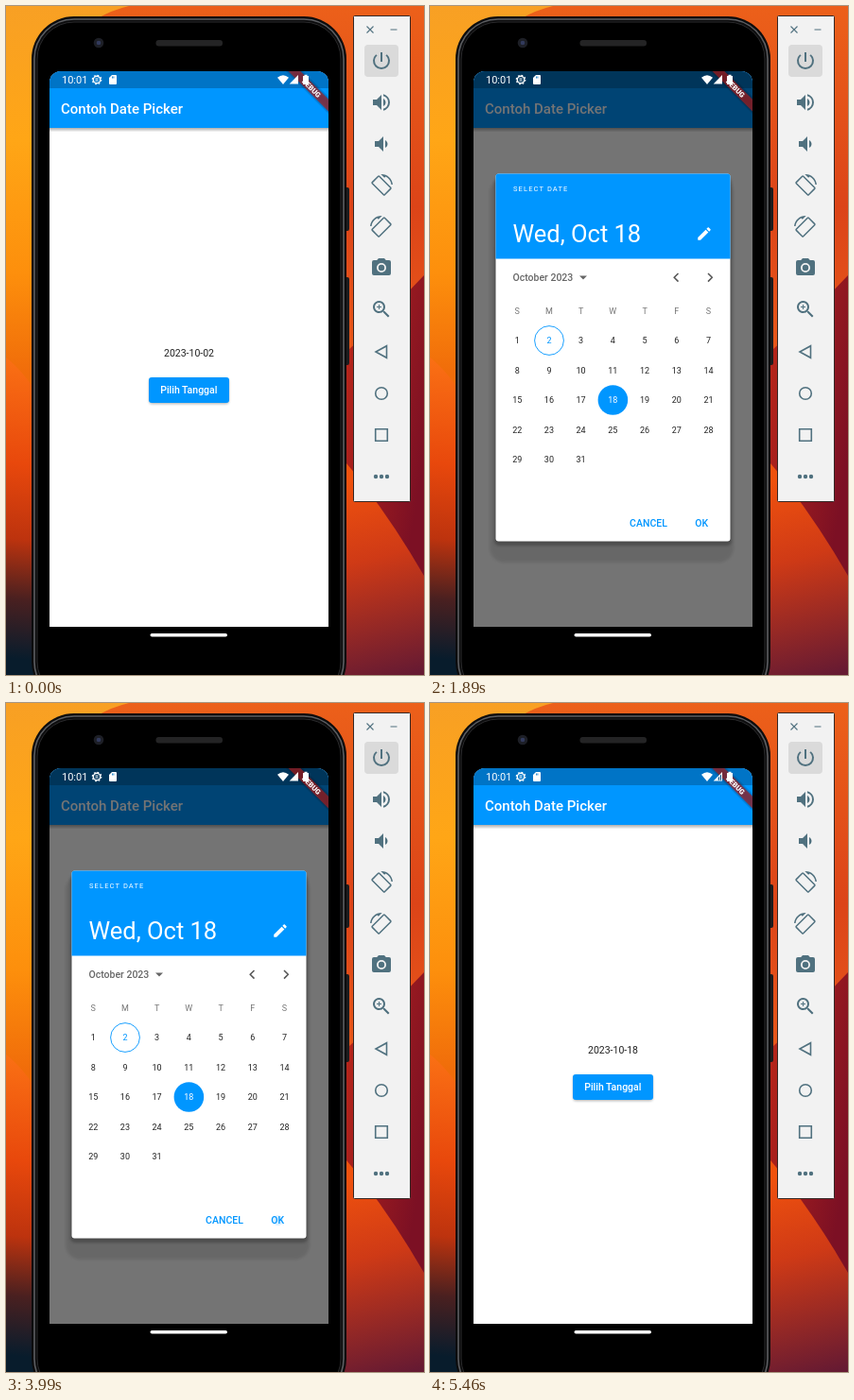
Write an HTML page that moves like this. It is 442x708 px and loops after 5950 ms.

```html
<!DOCTYPE html>
<html lang="id">
<head>
<meta charset="utf-8">
<title>Date picker</title>
<style>
  html, body { margin: 0; width: 100%; height: 100%; overflow: hidden; background: #000; }
  svg { display: block; width: 442px; height: 708px; }
  text { font: 10.5px Roboto, sans-serif; }
  .medium { font-weight: 500; }
  .mid { text-anchor: middle; }
  .white { fill: #fff; }
  .blue { fill: #0096ff; }
  .title { font-size: 15px; }
  .small { font-size: 9px; }
  .line { fill: none; stroke: #50717f; stroke-width: 1.6; }
</style>
</head>
<body>
<svg viewBox="0 0 442 708">
  <defs>
    <linearGradient id="left" x2="0" y2="1">
      <stop offset="0" stop-color="#f8a024"/>
      <stop offset=".2" stop-color="#ffa616"/>
      <stop offset=".4" stop-color="#fd8f0c"/>
      <stop offset=".55" stop-color="#f06c0a"/>
    </linearGradient>
    <linearGradient id="petal" gradientUnits="userSpaceOnUse" x1="30" y1="375" x2="0" y2="690">
      <stop offset="0" stop-color="#fa7014"/>
      <stop offset=".35" stop-color="#e8480c"/>
      <stop offset=".6" stop-color="#bd330e"/>
      <stop offset=".8" stop-color="#4a2020"/>
      <stop offset="1" stop-color="#081c2c"/>
    </linearGradient>
    <linearGradient id="right" x2="0" y2="1">
      <stop offset="0" stop-color="#ec601a"/>
      <stop offset=".3" stop-color="#dc4418"/>
      <stop offset=".52" stop-color="#e8581a"/>
      <stop offset="1" stop-color="#d03a18"/>
    </linearGradient>
    <linearGradient id="crimson" x2="1" y2=".6">
      <stop offset="0" stop-color="#c42a18"/>
      <stop offset="1" stop-color="#7c1024"/>
    </linearGradient>
    <linearGradient id="flame" gradientUnits="userSpaceOnUse" x1="372" y1="500" x2="425" y2="708">
      <stop offset="0" stop-color="#f0520e"/>
      <stop offset=".4" stop-color="#cf3a16"/>
      <stop offset="1" stop-color="#661a32"/>
    </linearGradient>
    <linearGradient id="drop" x2="0" y2="1">
      <stop offset="0" stop-opacity=".32"/>
      <stop offset="1" stop-opacity="0"/>
    </linearGradient>
    <filter id="soft"><feGaussianBlur stdDeviation="1.5"/></filter>
    <clipPath id="screen"><path d="M46 657V81a12 12 0 0 1 12-12H329a12 12 0 0 1 12 12V657Z"/></clipPath>
  </defs>

  <!-- wallpaper -->
  <path fill="url(#right)" d="M0 0H442V708H0Z"/>
  <path fill="url(#left)" d="M0 0H130Q95 8 60 40V708H0Z"/>
  <path fill="url(#petal)" d="M0 372Q16 384 36 414V708H0Z"/>
  <path fill="url(#crimson)" d="M350 375Q400 330 442 285V610L350 475Z"/>
  <path fill="url(#flame)" d="M350 472Q400 530 442 603V708H350Z"/>

  <!-- phone -->
  <path fill="#1c1c1e" d="M358 192h3q2 0 2 2v42q0 2-2 2h-3zM358 287h3q2 0 2 2v89q0 2-2 2h-3zM30 555h-3v60h3z"/>
  <rect x="27" y="11" width="333" height="728" rx="45" fill="#0c0c0d"/>
  <rect x="30" y="14" width="327" height="722" rx="42" fill="none" stroke="#5c5e62" stroke-width="1.6"/>
  <rect x="33" y="17" width="321" height="716" rx="39" fill="#000" stroke="#2a2a2c"/>
  <rect x="158.500" y="36" width="70.500" height="6.500" rx="3" fill="#242425"/>
  <circle cx="98" cy="39" r="5.300" fill="#1d1f26"/>
  <circle cx="98" cy="39" r="2.300" fill="#323a5c"/>
  <rect x="152.500" y="664" width="81.500" height="3.600" rx="1.800" fill="#fff"/>

  <g clip-path="url(#screen)">
    <path fill="#fff" d="M46 69H341V657H46Z"/>
    <path class="blue" d="M46 69H341V129H46Z"/>
    <path fill="#0074c6" d="M46 69H341V87H46Z"/>
    <path fill="url(#drop)" d="M46 129H341V133.500H46Z"/>
    <text class="title medium white" x="58" y="114">Contoh Date Picker</text>
    <text id="date" class="mid" x="193.500" y="371" fill="#222"></text>
    <rect x="151.500" y="394.500" width="84" height="26.500" rx="3" opacity=".32" filter="url(#soft)"/>
    <rect class="blue" x="151" y="393" width="85" height="27" rx="3"/>
    <text class="mid medium white" x="193.300" y="410.300">Pilih Tanggal</text>

    <path id="scrim" d="M46 69H341V657H46Z"/>
    <g id="dialog">
      <rect x="63" y="182" width="258" height="407" rx="16" opacity=".1" filter="url(#soft)"/>
      <rect x="68" y="182" width="251" height="389" rx="5" opacity=".25" filter="url(#soft)"/>
      <rect x="69.500" y="177.500" width="248" height="389" rx="3" fill="#fff"/>
      <path class="blue" d="M69.500 267.500V180.500q0-3 3-3h242q3 0 3 3v87z"/>
      <text class="white" x="88" y="196" style="font-size:7.5px;letter-spacing:1.13px">SELECT DATE</text>
      <text class="white" x="87.500" y="250" style="font-size:25.5px">Wed, Oct 18</text>
      <path class="white" transform="translate(281 232)scale(.751)" d="M3 17.250V21h3.750L17.810 9.940l-3.750-3.750zM20.710 7.040c.39-.39.39-1.020 0-1.410l-2.340-2.340c-.39-.39-1.020-.39-1.410 0l-1.830 1.830 3.750 3.750z"/>
      <text class="medium" x="87.500" y="291" fill="#666">October 2023</text>
      <path fill="#666" d="M158 285.500h8l-4 4z"/>
      <path fill="none" stroke="#555" stroke-width="1.5" d="M262.500 283l-4.300 4.300 4.300 4.300M294 283l4.300 4.300-4.300 4.300"/>
      <circle cx="126" cy="354" r="15.400" fill="none" stroke="#0096ff" stroke-width=".9"/>
      <circle class="blue" cx="193.400" cy="417" r="15.800"/>
      <g id="days"></g>
      <rect id="press" fill="#0096ff" fill-opacity=".13"/>
      <text class="mid medium blue" x="231" y="551">CANCEL</text>
      <text class="mid medium blue" x="287.300" y="551">OK</text>
    </g>

    <g transform="translate(341 69)rotate(45)">
      <path opacity=".4" filter="url(#soft)" d="M-34 20.500H34V30.500H-34Z"/>
      <path fill="#b71c1c" fill-opacity=".63" d="M-34 21H34V30H-34Z"/>
      <text class="mid white" y="28.200" style="font-size:7.6px;font-weight:900">DEBUG</text>
    </g>
  </g>

  <!-- status bar -->
  <g class="white">
    <text x="59" y="82" style="font-size:11px">10:01</text>
    <circle cx="96" cy="78" r="3.700" fill="none" stroke="#fff" stroke-width="1.400"/>
    <circle cx="96" cy="78" r="4.700" fill="none" stroke="#fff" stroke-width="1.300" stroke-dasharray="1.7 1.99"/>
    <path d="M94.500 76.500h3v1h-3zm0 2h3v1h-3z"/>
    <path d="M112 73h4q1 0 1 1v8q0 1-1 1h-6q-1 0-1-1v-6z"/>
    <path fill="#0074c6" d="M112 74.500h.8v2H112zm1.500 0h.8v2h-.8z"/>
    <path d="M293 83L287 75.700Q293 70.700 299 75.700Z"/>
    <path d="M309 73V82.500H299.700Z"/>
    <path id="signalGap" fill="#0a5288" d="M304.700 79l1.200-1.200v4h-1.200zM306.800 76.800l1.200-1.200v6.200h-1.200z"/>
    <path d="M314 74h1.500v-1.200h3V74h1.500v9h-6z"/>
  </g>

  <!-- emulator toolbar -->
  <rect x="367.500" y="10.500" width="60" height="514" rx="1" fill="#f2f2f2" stroke="#352826"/>
  <rect x="379" y="41" width="36" height="34" rx="4" fill="#dadada"/>
  <path class="line" style="stroke-width:1.1" d="M381.500 21.500l7 7m0-7l-7 7M406.500 25h7"/>
  <g id="tools" fill="#50717f"></g>
  <path class="line" d="M402.500 359.700V372.300L391 366Z"/>
  <circle class="line" cx="397" cy="410" r="6.300"/>
  <path class="line" d="M390.700 447.700h12.600v12.600h-12.600z"/>
  <path fill="none" stroke="#50717f" stroke-width="4.400" stroke-linecap="round" stroke-dasharray="0 6" d="M391 498h12.100"/>
</svg>
<script>
const LOOP = 5950, OPEN = 1890, PRESS = 3990, FADE = 4130, CLOSE = 4200;
const $ = id => document.getElementById(id);

function set(id, attrs) {
  for (const key in attrs) $(id).setAttribute(key, attrs[key]);
}

function add(parent, tag, attrs, text = '') {
  const el = document.createElementNS('http://www.w3.org/2000/svg', tag);
  for (const key in attrs) el.setAttribute(key, attrs[key]);
  el.textContent = text;
  $(parent).append(el);
}

function cell(text, col, y, fill) {
  add('days', 'text', { class: 'mid small', x: 92.2 + col * 33.72, y, fill }, text);
}

[...'SMTWTFS'].forEach((name, i) => cell(name, i, 325.5, '#777'));
for (let day = 1; day <= 31; day++) {
  const color = day === 2 ? '#0096ff' : day === 18 ? '#fff' : '#222';
  cell(day, (day - 1) % 7, 357.2 + Math.floor((day - 1) / 7) * 31.5, color);
}

// Toolbar icons on a 24-unit grid: vertical centre, path, horizontal flip
const rotate = 'M16.48 2.52c3.27 1.55 5.61 4.72 5.97 8.48h1.5C23.44 4.84 18.29 0 12 0l-.66.03 3.81 3.81zM10.23 1.75a1.5 1.5 0 0 0-2.12 0L1.75 8.11a1.5 1.5 0 0 0 0 2.12l12.02 12.02a1.5 1.5 0 0 0 2.12 0l6.36-6.36a1.5 1.5 0 0 0 0-2.12zM14.83 21.19L2.81 9.17l6.36-6.36 12.02 12.02z';
const icons = [
  [58, 'M13 3h-2v10h2zM17.83 5.17l-1.42 1.42C17.99 7.86 19 9.81 19 12a7 7 0 0 1-14 0c0-2.19 1.01-4.14 2.58-5.42L6.17 5.17A9 9 0 1 0 17.83 5.17z'],
  [102, 'M3 9v6h4l5 5V4L7 9zM16.5 12c0-1.77-1.02-3.29-2.5-4.03v8.05c1.48-.73 2.5-2.25 2.5-4.02zM14 3.23v2.06a7 7 0 0 1 0 13.42v2.06a9 9 0 0 0 0-17.54z'],
  [146, 'M18.5 12c0-1.77-1.02-3.29-2.5-4.03v8.05c1.48-.73 2.5-2.25 2.5-4.02zM5 9v6h4l5 5V4L9 9z'],
  [190, rotate],
  [234, rotate, -1],
  [277, 'M9 2L7.17 4H4a2 2 0 0 0-2 2v12a2 2 0 0 0 2 2h16a2 2 0 0 0 2-2V6a2 2 0 0 0-2-2h-3.17L15 2zM12 17a5 5 0 0 1 0-10a5 5 0 0 1 0 10zM12 8.8a3.2 3.2 0 0 0 0 6.4a3.2 3.2 0 0 0 0-6.4z'],
  [321, 'M15.5 14h-.79l-.28-.27a6.5 6.5 0 1 0-.7.7l.27.28v.79l5 4.99L20.49 19zM9.5 14a4.5 4.5 0 0 1 0-9a4.5 4.5 0 0 1 0 9zM12 10h-2v2H9v-2H7V9h2V7h1v2h2z']
];
for (const [y, d, flip = 1] of icons) {
  add('tools', 'path', { d, 'fill-rule': 'evenodd', transform: `translate(397 ${y})scale(${flip} 1)translate(-12 -12)` });
}

function draw(now) {
  const t = now % LOOP;
  const open = t >= OPEN && t < CLOSE;
  const picked = t >= FADE;
  $('date').textContent = picked ? '2023-10-18' : '2023-10-02';
  set('scrim', { opacity: !open ? 0 : picked ? 0.41 : 0.545 });
  set('dialog', { opacity: !open ? 0 : picked ? 0.63 : 1 });
  set('signalGap', { opacity: picked ? 1 : 0 });
  set('press', picked
    ? { x: 266, y: 534, width: 44.5, height: 26, rx: 5, opacity: 1 }
    : { x: 282, y: 542, width: 11, height: 11, rx: 5.5, opacity: t >= PRESS ? 1 : 0 });
  requestAnimationFrame(() => draw(performance.now() - start));
}

const start = performance.now();
draw(0);
</script>
</body>
</html>
```
